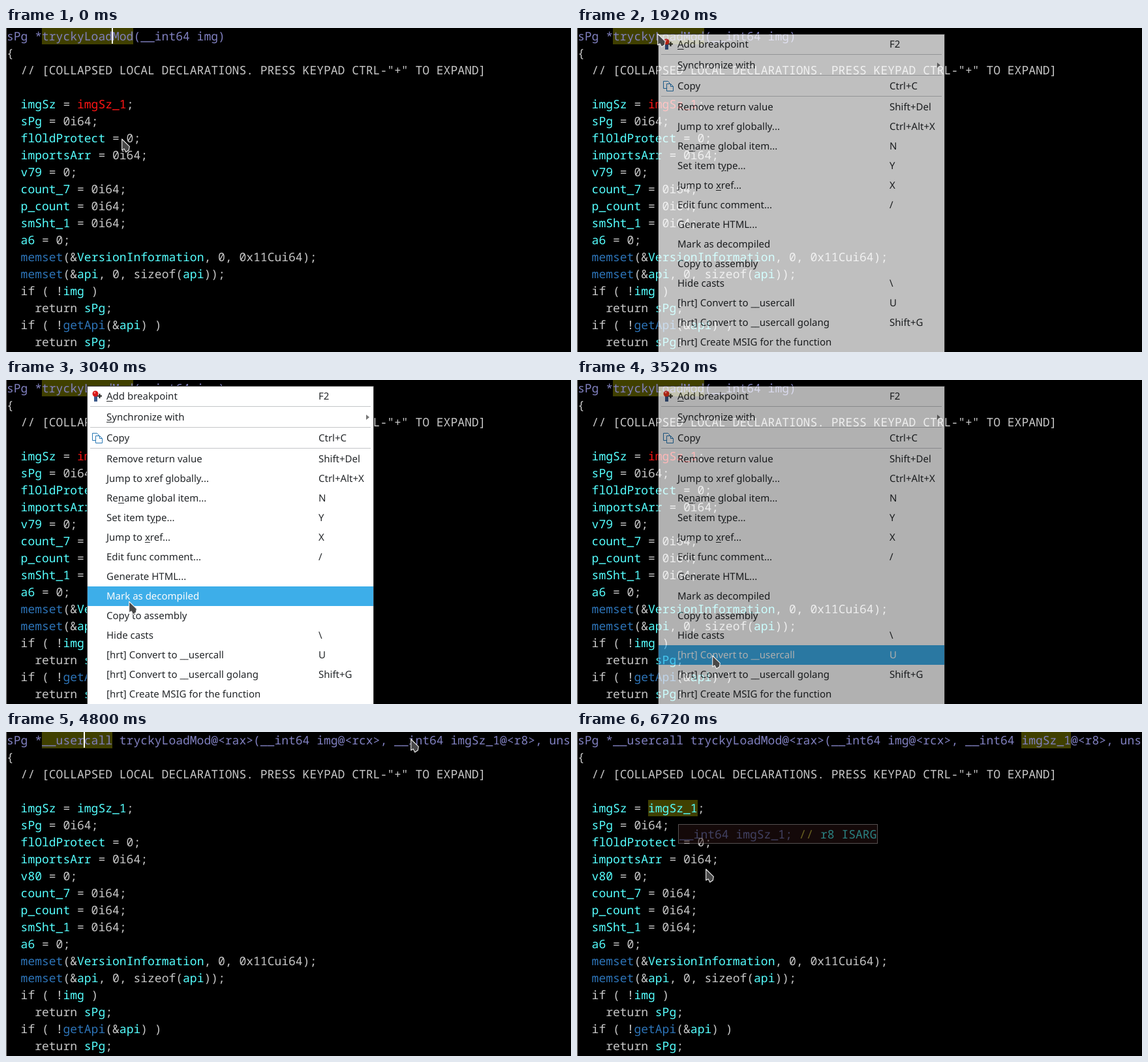
An HTML page that plays this animation: 866x496 px, repeating every 6800 ms.

```html
<!DOCTYPE html>
<html lang="en">
<head>
<meta charset="utf-8">
<title>Decompiler view</title>
<style>
html, body { margin: 0; width: 100%; height: 100%; overflow: hidden; background: #000; }
#stage {
  position: relative; width: 866px; height: 496px; overflow: hidden;
  background: #000; text-rendering: geometricPrecision;
}
#stage > * { position: absolute; }
pre, .tip { margin: 0; font: 18px "Noto Sans Mono", monospace; white-space: pre; }
#code { left: 1px; top: 0; line-height: 26px; color: #c8c8c8; }
#head { color: #8080c0; }
#code b { font-weight: normal; color: #5ff; }
#code i { font-style: normal; color: #2d74b8; }
#code b.bad { color: #ff1414; }
mark { background: #404000; color: inherit; padding-top: 1px; }
#edge { left: 0; top: 0; width: 1px; height: 496px; background: #909090; }
#caret { top: 0; width: 2px; height: 24px; background: #fff; }
.tip {
  box-sizing: border-box; height: 30px; padding: 2px 0 0 1px;
  border: 1px solid #aaa0a0; background: #281212;
  line-height: 26px; color: #8080c0;
}
.tip s { text-decoration: none; color: #d0c040; }
.tip em { font-style: normal; color: #5ff; }
#tipA { left: 173px; top: 138px; width: 500px; }
#tipB { left: 155px; top: 141px; width: 306px; }
#menu {
  left: 124px; top: 9px; width: 438px; height: 500px;
  border: 1px solid #333; background: #fff;
  font: 15px/30px "Noto Sans", sans-serif; color: #232629;
}
#menu > * { position: absolute; }
.item { left: 0; width: 438px; height: 30px; white-space: pre; }
.item span { position: absolute; left: 29px; }
.item span + span { left: 354px; }
.item.on { background: #3daee9; color: #fcfcfc; }
.item u { text-underline-offset: 2px; text-decoration-thickness: 1px; }
.item.split::before {
  content: ""; position: absolute; left: 4px; top: 30px;
  width: 430px; height: 1px; background: #c4c6c8;
}
.more::after {
  content: ""; position: absolute; left: 427px; top: 11px;
  border: 4.5px solid transparent; border-left: 5px solid #777; border-right: 0;
}
.more.on::after { border-left-color: #d8eefa; }
#menu svg { left: -1px; top: 0; pointer-events: none; }
#mouse { left: 0; top: 1px; overflow: visible; }
</style>
</head>
<body>
<div id="stage">
<pre id="code"><span id="head"></span>
{
  // [COLLAPSED LOCAL DECLARATIONS. PRESS KEYPAD CTRL-"+" TO EXPAND]

  <b>imgSz</b> = <b id="size"></b>;
  <b>sPg</b> = 0i64;
  <b>flOldProtect</b> = 0;
  <b>importsArr</b> = 0i64;
  <b id="temp"></b> = 0;
  <b>count_7</b> = 0i64;
  <b>p_count</b> = 0i64;
  <b>smSht_1</b> = 0i64;
  <b>a6</b> = 0;
  <i>memset</i>(&amp;<b>VersionInformation</b>, 0, 0x11Cui64);
  <i>memset</i>(&amp;<b>api</b>, 0, sizeof(<b>api</b>));
  if ( !<b>img</b> )
    return <b>sPg</b>;
  if ( !<i>getApi</i>(&amp;<b>api</b>) )
    return <b>sPg</b>;</pre>
<div id="edge"></div>
<div id="caret"></div>
<div class="tip" id="tipA">__int64 imgSz_1; <s>//</s> <em>r8 VALUE MAY BE UNDEFINED</em></div>
<div class="tip" id="tipB">__int64 imgSz_1; <s>//</s> <em>r8 ISARG</em></div>
<div id="menu"></div>
<svg id="mouse" width="14" height="22">
  <path d="M.7 1V18L4.2 16 6.7 21 11.3 18 12.3 12.3Z" fill="#484848" stroke="#f0f0f0" stroke-width="1.1" stroke-linejoin="round"/>
</svg>
</div>
<script>
const LOOP = 6800, STEP = 80, BLINK = 400, CHAR = 10.8;
const MENU_OPEN = 1680, MENU_PICK = 3440, REFOCUS = 3680, RETYPED = 4000, ARG_CLICK = 5200;
const $ = id => document.getElementById(id);
const clamp = v => Math.max(0, Math.min(1, v));

const items = [
  ["<u>A</u>dd breakpoint", "F2"], ["<u>S</u>ynchronize with", ""], ["Copy", "Ctrl+C"],
  ["Remove return value", "Shift+Del"], ["Jump to xref globally...", "Ctrl+Alt+X"],
  ["Re<u>n</u>ame global item...", "N"], ["Set item t<u>y</u>pe...", "Y"],
  ["Jump to <u>x</u>ref...", "X"], ["Edit func comment...", "/"],
  ["Generate HTML...", ""], ["Mark as decompiled", ""], ["Copy to assembly", ""],
  ["Hide casts", "\\"], ["[hrt] Convert to __usercall", "U"],
  ["[hrt] Convert to __usercall golang", "Shift+G"],
  ["[hrt] Create MSIG for the function", ""]
];
// The first three items are each followed by a 2px separator
const rows = items.map(([label, key], i) => {
  const el = document.createElement("div");
  const top = i * 30 + Math.min(i, 3) * 2;
  el.className = "item" + (i < 3 ? " split" : "") + (i === 1 ? " more" : "");
  el.style.top = top + "px";
  el.innerHTML = `<span>${label}</span><span>${key}</span>`;
  $("menu").append(el);
  return { el, top: top + 10 };
});
$("menu").insertAdjacentHTML("beforeend", `
<svg width="30" height="100">
  <path d="M11 14h5v9h-5z" fill="#3c5a8c"/>
  <circle cx="13" cy="11" r="4.5" fill="#d81818"/>
  <circle cx="12" cy="9.5" r="1.3" fill="#ff8a80"/>
  <path d="M16 14.5h7M19.5 11v7" stroke="#222" stroke-width="2"/>
  <g fill="#fff" stroke="#2878b4">
    <path d="M8.5 71.5h7l2 2v9h-9z"/>
    <path d="M13.5 75.5h6l4 4v7h-10z"/>
    <path d="M19.5 75.5v4h4" fill="none"/>
  </g>
</svg>`);

// Each glide runs from its start time to its end time and then rests
const glides = [
  { from: 0, to: 240, x: 152, y: 115 },
  { from: 1280, to: 1600, x: 123, y: 7 },
  { from: 2080, to: 2320, x: 153, y: 62 },
  { from: 2320, to: 2800, x: 160, y: 142 },
  { from: 2800, to: 3040, x: 188, y: 337 },
  { from: 3040, to: 3280, x: 207, y: 420 },
  { from: REFOCUS, to: 4800, x: 620, y: 9 },
  { from: 4800, to: 5040, x: 701, y: 9 },
  { from: 5280, to: 5840, x: 131, y: 117 },
  { from: 6560, to: 6720, x: 197, y: 208 }
];
function pointer(t) {
  let x = 177, y = 168;
  for (const g of glides) {
    const f = clamp((t - g.from) / (g.to - g.from));
    x += (g.x - x) * f;
    y += (g.y - y) * f;
  }
  return [Math.round(x), Math.round(y)];
}

// Column of the caret, or -1 while it is blinked off or the menu has focus
function caretColumn(t) {
  const [since, col] = t < 1600 ? [-240, 15] : t <= ARG_CLICK ? [REFOCUS, 11] : [ARG_CLICK + STEP, 65];
  return t >= since && (t - since) % (2 * BLINK) < BLINK ? col : -1;
}

const call = (conv, arg) =>
  `sPg *${conv} tryckyLoadMod@&lt;rax&gt;(__int64 img@&lt;rcx&gt;, __int64 ${arg}@&lt;r8&gt;, unsigned`;
const hit = s => `<mark>${s}</mark>`;
const views = {
  plain: { head: `sPg *${hit("tryckyLoadMod")}(__int64 img)`, size: "imgSz_1", temp: "v79", bad: true },
  retyped: { head: call(hit("__usercall"), "imgSz_1"), size: "imgSz_1", temp: "v80" },
  picked: { head: call("__usercall", hit("imgSz_1")), size: hit("imgSz_1"), temp: "v80" }
};

function show(id, alpha) {
  $(id).style.opacity = alpha;
  $(id).style.visibility = alpha > 0 ? "visible" : "hidden";
}
// Rises after open and falls after close, each in its own time
const fade = (t, open, close, rise, fall) =>
  Math.min(clamp((t - open) / rise), clamp(1 - (t - close) / fall));

let shown;
function draw(t) {
  const view = t < RETYPED ? views.plain : t < ARG_CLICK ? views.retyped : views.picked;
  if (view !== shown) {
    shown = view;
    for (const id of ["head", "size", "temp"]) $(id).innerHTML = view[id];
    $("size").className = view.bad ? "bad" : "";
  }
  const [x, y] = pointer(t);
  $("mouse").style.transform = `translate(${x}px,${y}px)`;
  for (const { el, top } of rows) el.classList.toggle("on", y >= top && y < top + 30);

  const col = caretColumn(t);
  $("caret").style.left = Math.round(col * CHAR) + "px";
  show("caret", col < 0 ? 0 : 1);
  show("menu", fade(t, MENU_OPEN, MENU_PICK, 320, 260));
  show("tipA", fade(t, 480, 1200, 160, 320));
  show("tipB", fade(t, 5840, 6560, 160, 320));
}

const start = performance.now();
function tick() {
  const t = (performance.now() - start) % LOOP;
  draw(Math.floor(t / STEP) * STEP);
  requestAnimationFrame(tick);
}
tick();
</script>
</body>
</html>
```
